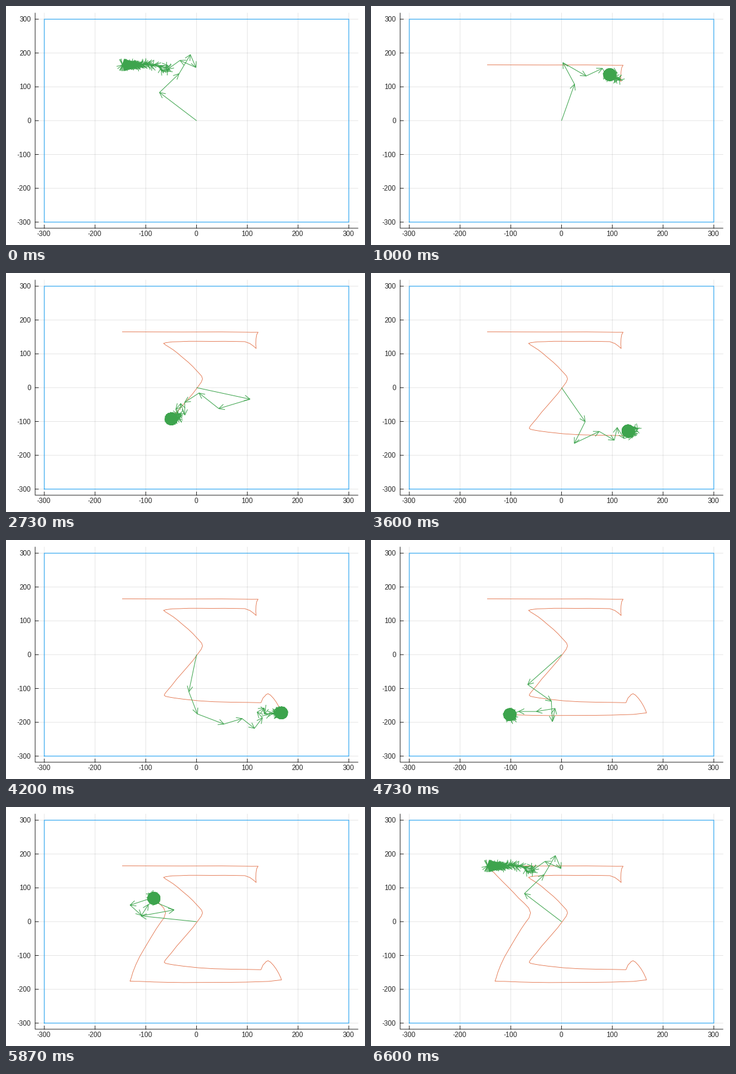
A matplotlib script for the animation above (6.67 s loop, 600x400 px).

```python
import numpy as np
import matplotlib.pyplot as plt
from matplotlib.animation import FuncAnimation
from matplotlib.collections import LineCollection

W, H, DPI = 600, 400, 100
PX = 72 / DPI                      # one pixel in points
LOOP, POSES = 6670, 100
TICKS = 3                          # draws per pose
STEPS = POSES - 1                  # the last pose closes the path

BLUE, ORANGE, GREEN = "#009AFA", "#E26F46", "#3DA44D"
INK = "#262626"

# Plot area in pixels and the data range it shows
LEFT, RIGHT, TOP, BOTTOM = 48.75, 588.2, 11.9, 371.9
LIMIT, FRAME = 318, 300
HEAD, SPREAD = 10.5, np.radians(26)

# Turning points of the letter: (step, x, y)
TURNS = [
    (0, -146, 165), (1, -28, 165), (3, 95, 164), (6, 121, 164),
    (10, 117, 144), (12, 117, 116), (15, 95, 136), (20, -15, 137),
    (24, -65, 131), (27, -46, 112), (32, 0, 50), (35, 12, 26),
    (37, 3, 3), (41, -50, -92), (44, -64, -120), (47, -44, -128),
    (50, 34, -139), (53, 127, -142), (54, 131, -128), (57, 141, -116),
    (63, 167, -172), (65, 98, -179), (68, -25, -180), (71, -102, -177),
    (75, -131, -176), (78, -120, -128), (82, -80, -22), (85, -61, 26),
    (88, -84, 69), (92, -123, 129), (99, -146, 165),
]


def px(x):
    return LEFT + (x + LIMIT) / (2 * LIMIT) * (RIGHT - LEFT)


def py(y):
    return BOTTOM - (y + LIMIT) / (2 * LIMIT) * (BOTTOM - TOP)


def to_px(z):
    return px(z.real) + 1j * py(z.imag)


def pairs(z):
    return np.column_stack([z.real, z.imag])


def ease(s, t, v):
    """Smooth curve through (t, v) that never overshoots a turn."""
    gap, slope = np.diff(t), np.diff(v) / np.diff(t)
    a, b = slope[:-1], slope[1:]
    same = a * b > 0
    tangent = np.concatenate([slope[:1], np.zeros(len(a)), slope[-1:] * 0.3])
    tangent[1:-1][same] = 2 * a[same] * b[same] / (a + b)[same]
    k = np.clip(np.searchsorted(t, s, side="right") - 1, 0, len(gap) - 1)
    u, g = (s - t[k]) / gap[k], gap[k]
    rise = u * u * (3 - 2 * u)
    return (v[k] + (v[k + 1] - v[k]) * rise
            + g * u * (1 - u) * (tangent[k] * (1 - u) - tangent[k + 1] * u))


def fourier():
    """Frequencies and coefficients of the outline, largest first."""
    n = 4 * STEPS
    t, x, y = np.array(TURNS, float).T
    s = np.arange(n) / 4
    rng = np.random.default_rng(4)
    z = ease(s, t, x) + 1j * ease(s, t, y)
    z += rng.normal(0, 0.2, n) + 1j * rng.normal(0, 0.2, n)
    c = np.fft.fft(z) / n
    freq = np.fft.fftfreq(n, 1 / n)
    order = np.argsort(-np.abs(c))
    return freq[order], c[order]


FREQ, COEF = fourier()


def chain(pose):
    """Joints of the rotating vectors, from the origin to the pen."""
    spin = np.exp(2j * np.pi * FREQ * pose / STEPS)
    return np.concatenate([[0], np.cumsum(COEF * spin)])


def arrows(joints):
    z = to_px(joints)
    a, b = z[:-1], z[1:]
    back = HEAD * np.exp(1j * np.angle(a - b))
    ends = [a, b + back * np.exp(1j * SPREAD), b + back * np.exp(-1j * SPREAD)]
    return np.concatenate([np.stack([pairs(e), pairs(b)], axis=1) for e in ends])


PEN = pairs(to_px(np.array([chain(p)[-1] for p in range(POSES)])))

fig = plt.figure(figsize=(W / DPI, H / DPI), dpi=DPI, facecolor="white")
ax = fig.add_axes([0, 0, 1, 1])
ax.set_xlim(0, W)
ax.set_ylim(H, 0)
ax.axis("off")


def line(xs, ys, color, width=1.0, **kw):
    return ax.plot(xs, ys, color=color, lw=width * PX, snap=False, **kw)[0]


def draw_axes():
    font = dict(family="Liberation Sans", size=8.3, color=INK, va="baseline")
    for v in range(-FRAME, FRAME + 1, 100):
        x, y = px(v), py(v)
        line([x, x], [TOP, BOTTOM], "black", alpha=0.1)
        line([LEFT, RIGHT], [y, y], "black", alpha=0.1)
        line([x, x], [BOTTOM, BOTTOM - 5.4], INK)
        line([LEFT, LEFT + 5.4], [y, y], INK)
        ax.text(x - 0.5, 385, str(v), ha="center", **font)
        ax.text(42, y + 4.2, str(v), ha="right", **font)
    line([LEFT, LEFT, RIGHT], [TOP, BOTTOM, BOTTOM], INK)


draw_axes()
x0, x1, y0, y1 = px(-FRAME), px(FRAME), py(-FRAME), py(FRAME)
line([x0, x1, x1, x0, x0], [y0, y0, y1, y1, y0], BLUE, 0.9)
trail = line([], [], ORANGE, 0.85)
vectors = LineCollection([], colors=GREEN, linewidths=PX, zorder=5)
ax.add_collection(vectors, autolim=False)


def update(i):
    pose = min((i + 1) // TICKS, STEPS)
    trail.set_data(*PEN[:pose + 1].T)
    vectors.set_segments(arrows(chain(pose)))
    return trail, vectors


def start():
    return update(0)


anim = FuncAnimation(fig, update, frames=POSES * TICKS, init_func=start,
                     interval=LOOP / (POSES * TICKS), repeat=True,
                     repeat_delay=0)
plt.show()
```
